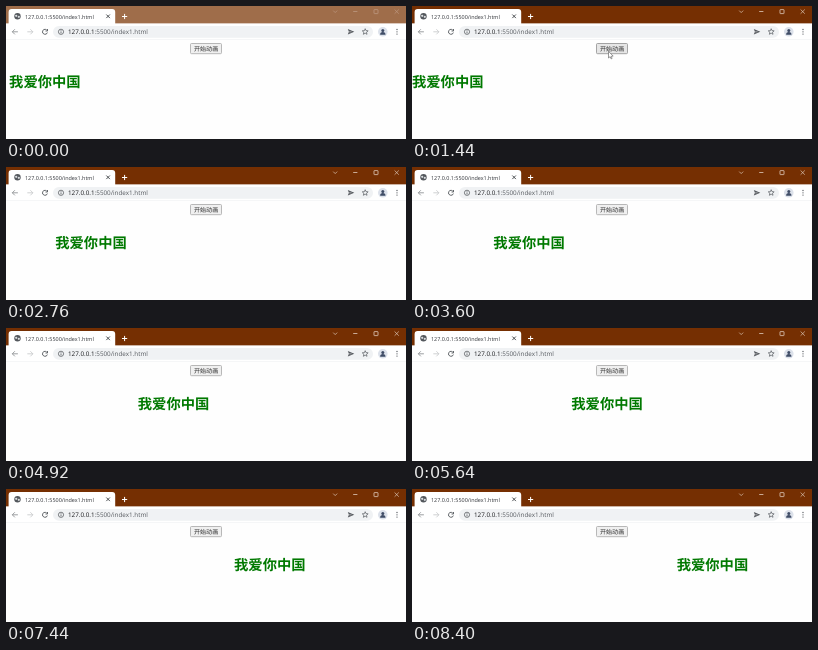
Write an HTML page with a canvas that moves like this. It is 400 by 133 pixels and loops after 8520 ms.

```html
<!DOCTYPE html>
<html lang="zh-CN">
<head>
<meta charset="utf-8">
<title>index1.html</title>
<style>
html, body { margin: 0; width: 100%; height: 100%; overflow: hidden; background: #fff; }
canvas { display: block; width: 400px; height: 133px; }
</style>
</head>
<body>
<canvas id="stage" width="400" height="133"></canvas>
<script>
const ctx = document.getElementById('stage').getContext('2d');
const TAU = Math.PI * 2;
const LOOP = 8520, STEP = 120;
const FOCUS = 1320, START = 1470, SPEED = 0.0382;
const LATIN = '"Open Sans", "Noto Sans", sans-serif';
const HAN = '"Noto Sans CJK SC", "Noto Sans CJK", "Noto Sans CJK JP", sans-serif';
const HOST = '127.0.0.1', PATH = ':5500/index1.html';
const DARK = '#54585d', PILL = '#f0f2f4', ROW = 25.8;

function fill(color) {
  ctx.fillStyle = color;
  ctx.fill();
}

function stroke(color, width) {
  ctx.strokeStyle = color;
  ctx.lineWidth = width;
  ctx.stroke();
}

function rect(x, y, w, h, color) {
  ctx.fillStyle = color;
  ctx.fillRect(x, y, w, h);
}

function round(x, y, w, h, r) {
  ctx.beginPath();
  ctx.roundRect(x, y, w, h, r);
}

function circle(x, y, r, from = 0, to = TAU) {
  ctx.beginPath();
  ctx.arc(x, y, r, from, to);
}

function line(x1, y1, x2, y2, color, width) {
  ctx.beginPath();
  ctx.moveTo(x1, y1);
  ctx.lineTo(x2, y2);
  stroke(color, width);
}

function cross(x, y, r, color, width) {
  line(x - r, y - r, x + r, y + r, color, width);
  line(x + r, y - r, x - r, y + r, color, width);
}

// V-shaped head with its tip at (x, y), pointing along the given angle
function chevron(x, y, r, angle, color, width) {
  ctx.beginPath();
  for (const turn of [-3, 0, 3]) {
    const a = angle + turn * Math.PI / 4;
    ctx.lineTo(x + (turn ? r * Math.cos(a) : 0), y + (turn ? r * Math.sin(a) : 0));
  }
  stroke(color, width);
}

function text(str, x, y, size, color, family, weight = 400) {
  ctx.font = `${weight} ${size}px ${family}`;
  ctx.fillStyle = color;
  ctx.fillText(str, x, y);
  return ctx.measureText(str).width;
}

function drawTabs(active) {
  rect(0, 0, 400, 17.6, active ? '#752f02' : '#9f6d4a');
  round(2.6, 3, 106.6, 15, [3, 3, 0, 0]);
  fill('#fff');

  circle(11.5, 10.3, 3.2);
  fill(DARK);
  for (const side of [-1, 1]) {
    circle(11.5 + side * 1.3, 10.3 + side * 0.5, 1.1);
    fill('#dcdfe2');
  }
  text(HOST + PATH, 19, 12.5, 5.43, '#303338', LATIN);
  cross(102.1, 10.3, 1.8, '#3c4043', 0.9);
  cross.call(null, 0, 0, 0, '#fff', 0);
  line(116, 10.5, 121.2, 10.5, '#fff', 1);
  line(118.6, 7.9, 118.6, 13.1, '#fff', 1);

  const ink = active ? '#dfcabb' : '#bd9881';
  chevron(329.2, 6.6, 2.8, Math.PI / 2, ink, 0.7);
  line(347.2, 5.5, 351.4, 5.5, ink, 0.8);
  round(368, 3.6, 4, 4, 0.4);
  stroke(ink, 0.8);
  cross(390.7, 5.6, 2.1, ink, 0.7);
}

function drawArrow(x, dir, color) {
  const tip = x + dir * 2.8;
  line(x - dir * 2.8, ROW, tip, ROW, color, 0.8);
  chevron(tip, ROW, 3.6, dir > 0 ? 0 : Math.PI, color, 0.8);
}

function drawStar(x, y, r) {
  ctx.beginPath();
  for (let i = 0; i < 10; i++) {
    const a = i * TAU / 10 - TAU / 4, k = i % 2 ? r * 0.45 : r;
    ctx.lineTo(x + k * Math.cos(a), y + k * Math.sin(a));
  }
  ctx.closePath();
  stroke(DARK, 0.7);
}

function drawPlane(x, y) {
  ctx.beginPath();
  ctx.moveTo(x - 3.2, y - 2.8);
  ctx.lineTo(x + 3.3, y);
  ctx.lineTo(x - 3.2, y + 2.8);
  ctx.lineTo(x - 2.1, y);
  fill(DARK);
  line(x - 2.2, y, x + 0.6, y, PILL, 0.5);
}

function drawToolbar() {
  rect(0, 17.6, 400, 15.4, '#fff');
  drawArrow(9.1, -1, '#85888b');
  drawArrow(24.1, 1, '#c4c6c8');
  circle(39, ROW, 2.5, 0.3, 5.5);
  stroke(DARK, 0.9);
  chevron(41.5, 25, 2, TAU / 8, DARK, 0.9);

  round(47, 20, 320, 11.8, 5.9);
  fill(PILL);
  circle(55, ROW, 2.6);
  stroke(DARK, 0.75);
  line(55, 25.4, 55, 27.3, DARK, 0.8);
  line(55, 24.2, 55, 24.9, DARK, 0.8);
  const w = text(HOST, 62, 28.1, 6.3, '#17181b', LATIN);
  text(PATH, 62 + w, 28.1, 6.3, '#55595e', LATIN);

  drawPlane(345, ROW);
  drawStar(359.2, ROW, 3.1);

  circle(376.8, ROW, 4.8);
  fill('#dce1ea');
  circle(376.8, ROW - 1.4, 1.5);
  fill('#3f4c66');
  circle(376.8, ROW + 3, 2.7, Math.PI, TAU);
  fill('#3f4c66');
  for (const dy of [-2.3, 0, 2.3]) {
    circle(391, ROW + dy, 0.65);
    fill(DARK);
  }
  rect(0, 33, 400, 0.6, '#f1f2f3');
}

function drawButton(hover) {
  round(184.5, 37.5, 31, 10.2, 1);
  fill(hover ? '#e6e6e6' : '#f0f0f0');
  stroke(hover ? '#909090' : '#a8a8a8', 0.8);
  text('开始动画', 188, 45.1, 6.05, '#2a2a2a', HAN);
}

function drawCursor(x, y) {
  ctx.beginPath();
  ctx.moveTo(x, y);
  ctx.lineTo(x, y + 6.6);
  ctx.lineTo(x + 1.6, y + 5.3);
  ctx.lineTo(x + 2.7, y + 7.5);
  ctx.lineTo(x + 3.6, y + 7);
  ctx.lineTo(x + 2.7, y + 4.9);
  ctx.lineTo(x + 4.7, y + 4.7);
  ctx.closePath();
  fill('#fff');
  stroke('#555', 0.6);
}

function draw(t) {
  rect(0, 0, 400, 133, '#fefefe');
  ctx.textRendering = 'geometricPrecision';

  drawTabs(t >= FOCUS);
  drawToolbar();
  drawButton(t >= 1080 && t < 2040);

  const x = t < 1440 ? 3.1 : Math.max(0, (t - START) * SPEED);
  text('我爱你中国', x, 81, 14.3, '#007900', HAN, 700);

  if (t >= 240 && t < 2040) {
    const left = (1 - Math.min(1, (t - 240) / 840)) ** 2;
    drawCursor(196.5 + 36 * left, 45.4 + 58 * left);
  }
}

function tick() {
  const t = performance.now() % LOOP;
  draw(Math.floor(t / STEP) * STEP);
  requestAnimationFrame(tick);
}
tick();
</script>
</body>
</html>
```
